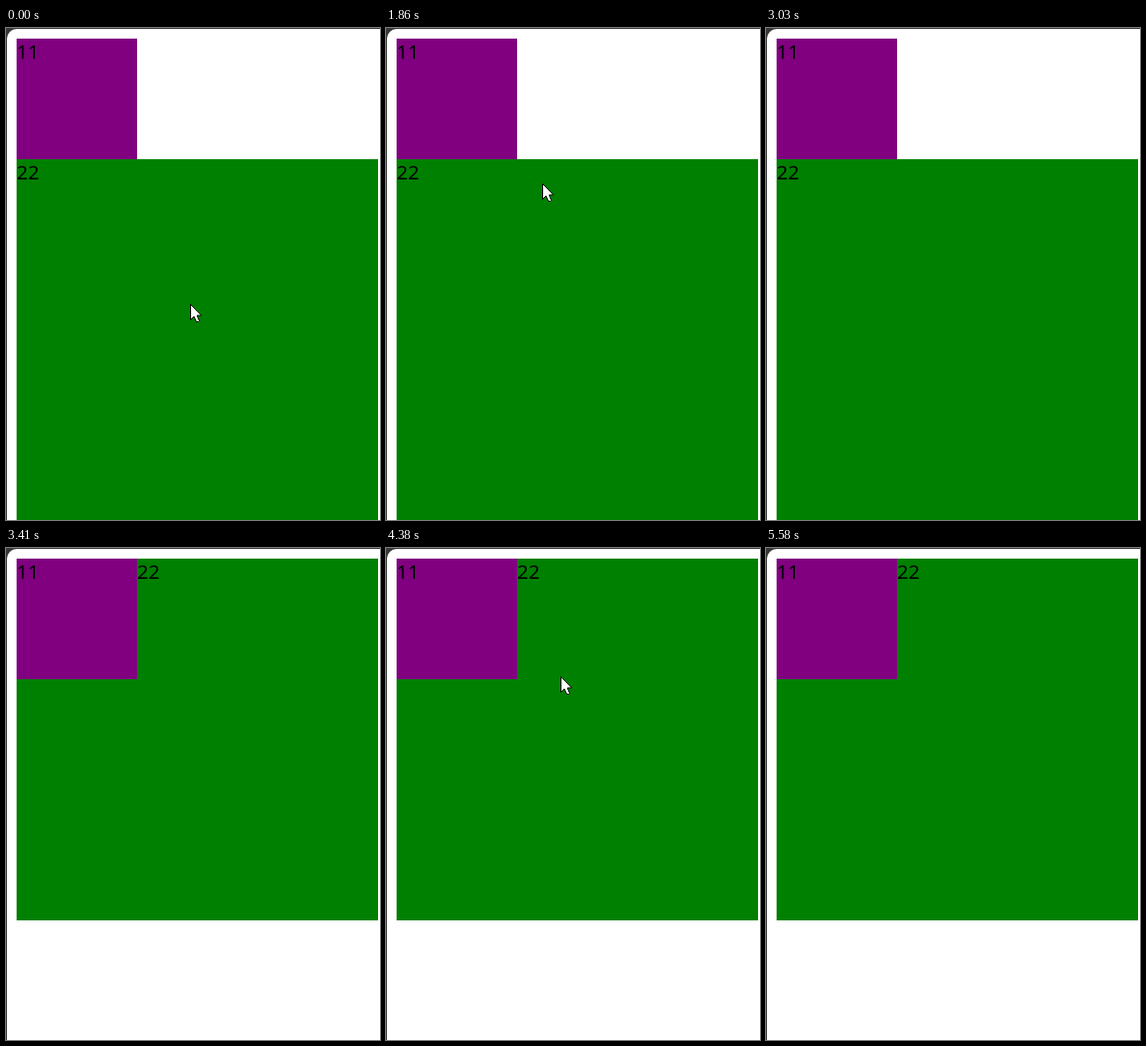
These frames come from a looping animation (388 by 510 pixels, 6340 ms). An HTML page:

```html
<!DOCTYPE html>
<html>
<head>
<meta charset="utf-8">
<style>
  html, body { margin: 0; width: 100%; height: 100%; overflow: hidden; }
  svg { display: block; }
  text { font: 20.5px "Noto Sans", "Open Sans", sans-serif; }
</style>
</head>
<body>
<svg width="388" height="510" viewBox="0 0 388 510">
  <rect width="388" height="510" fill="#383836"/>
  <rect x="1" y="1" width="420" height="540" rx="10" fill="#fff"/>
  <rect id="large" x="11" width="375" height="375" fill="#008000"/>
  <rect x="11" y="11" width="125" height="125" fill="#800080"/>
  <text x="11" y="32">11</text>
  <text id="label">22</text>
  <path id="cursor" d="M.5 .5V16.5L4 13L6.5 18.5H8.5L9.5 17.5L7.2 12H11.7Z" fill="#fff" stroke="#000"/>
</svg>
<script>
const LOOP = 6340, FLOAT_AT = 3410, STEP = 40;
const $ = id => document.getElementById(id);

// Cursor strokes: each bends from the last end point past `via` to `to`
const start = [191, 286];
const strokes = [
  { from: 50, until: 540, via: [210, 284], to: [190, 273] },
  { from: 1200, until: 1220, via: [189, 273], to: [188, 273] },
  { from: 1600, until: 2200, via: [160, 132], to: [118, 27] },
  { from: 2300, until: 2860, via: [94, 6], to: [114, -15] },
  { from: 2960, until: 3030, via: [115, -18], to: [116, -22] },
  { from: 3680, until: 4280, via: [150, 40], to: [177, 125] },
  { from: 4380, until: 4980, via: [243, 255], to: [214, 440] },
  { from: 5080, until: 5580, via: [208, 464], to: [193, 512] }
];

const ease = u => 0.4 * u + 0.6 * u * u * (3 - 2 * u);
const bend = (a, b, c, s) => (1 - s) ** 2 * a + 2 * s * (1 - s) * b + s * s * c;

function tipAt(t) {
  let tip = start;
  for (const { from, until, via, to } of strokes) {
    if (t < from) break;
    const count = Math.floor((until - from) / STEP) + 1;
    const done = Math.floor((t - from) / STEP) + 1;
    const s = ease(Math.min(1, done / count));
    tip = tip.map((v, i) => Math.round(bend(v, via[i], to[i], s)));
  }
  return tip;
}

function draw() {
  const t = performance.now() % LOOP, floated = t >= FLOAT_AT;
  $("large").setAttribute("y", floated ? 11 : 136);
  $("label").setAttribute("x", floated ? 136 : 11);
  $("label").setAttribute("y", floated ? 32 : 157);
  $("cursor").setAttribute("transform", `translate(${tipAt(t)})`);
  requestAnimationFrame(draw);
}
draw();
</script>
</body>
</html>
```
